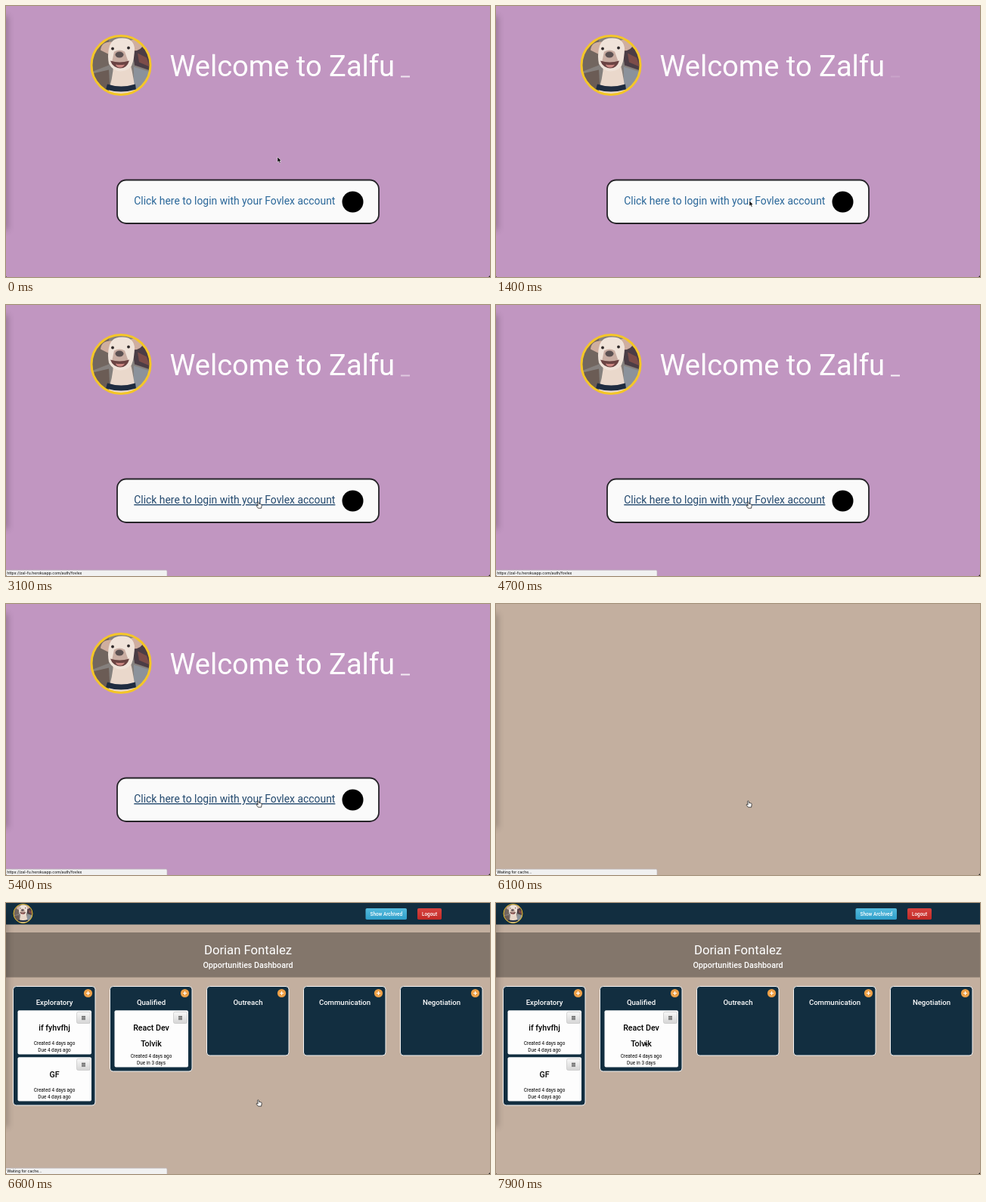
Recreate the animation shown at these times as an HTML page. Size 640 by 359 pixels, loop 8 s.

```html
<!DOCTYPE html>
<html lang="en">
<head>
<meta charset="utf-8">
<title>Login to dashboard</title>
<style>
  html, body { margin: 0; width: 100%; height: 100%; overflow: hidden; background: #c3af9f; }
  svg { display: block; width: 640px; height: 359px; font-family: Roboto, sans-serif; }
  text { white-space: pre; }
  .mid { text-anchor: middle; }
  .bold { font-weight: 500; }
  .white { fill: #fff; }
  .status text { font: 500 5px Inter, sans-serif; fill: #222; }

  /* Scene changes are hard cuts on one shared 8 s clock. */
  .cut { animation: 8s step-end infinite; }
  #welcome { animation-name: welcome; }
  #link { animation-name: link; }
  #board { animation-name: board; }
  #url { animation-name: url; }
  #cache { animation-name: cache; }
  #arrow { animation-name: arrow; }
  #hand { animation-name: hand; }
  #pointer { animation: move 8s linear infinite; }

  @keyframes welcome { 0%, 77.5% { opacity: 1 } 68.75%, 81.25%, 100% { opacity: 0 } }
  @keyframes link {
    0%, 68.75%, 100% { fill: #2a6799; text-decoration: none }
    35% { fill: #23496e; text-decoration: underline }
  }
  @keyframes board { 0% { opacity: 0 } 81.25%, 100% { opacity: 1 } }
  @keyframes url { 0%, 75%, 100% { opacity: 0 } 36.25% { opacity: 1 } }
  @keyframes cache { 0%, 86.25%, 100% { opacity: 0 } 75% { opacity: 1 } }
  @keyframes arrow { 0%, 86.25%, 100% { opacity: 1 } 35% { opacity: 0 } }
  @keyframes hand { 0%, 86.25%, 100% { opacity: 0 } 35% { opacity: 1 } }
  @keyframes move {
    0%, 3% { transform: translate(359px, 200px); animation-timing-function: ease-in-out }
    17%, 34% { transform: translate(335px, 258px) }
    36%, 87% { transform: translate(334px, 261px); animation-timing-function: ease-in-out }
    98.5%, 100% { transform: translate(196.5px, 183px) }
  }
</style>
</head>
<body>
<svg viewBox="0 0 640 359">
  <defs>
    <clipPath id="disc"><circle r="39"/></clipPath>
    <filter id="soft" x="-200%" y="-10%" width="500%" height="120%"><feGaussianBlur stdDeviation="4"/></filter>
    <filter id="photo"><feGaussianBlur stdDeviation=".7"/></filter>
    <linearGradient id="blue" x2="0" y2="1"><stop stop-color="#55bbdd"/><stop offset="1" stop-color="#2f9fca"/></linearGradient>
    <linearGradient id="red" x2="0" y2="1"><stop stop-color="#d8433f"/><stop offset="1" stop-color="#c12a26"/></linearGradient>
    <linearGradient id="grey" x2="0" y2="1"><stop stop-color="#f8f8f8"/><stop offset="1" stop-color="#d5d5d5"/></linearGradient>
    <g id="dog">
      <g clip-path="url(#disc)"><g filter="url(#photo)">
        <path fill="#85807d" d="M-42-42H42V42H-42z"/>
        <path fill="#72665f" d="M-42-42H-16V0L-42 10z"/>
        <path fill="#6b5c55" d="M-42 12-16 6-14 42H-42z"/>
        <path fill="#4b3d45" d="M14-30 42-22V8L18 0z"/>
        <path fill="#7c4d4a" d="M22-16 34-10 38 2 24-4z"/>
        <path fill="#8b929b" d="M17 2 42 10V42H17z"/>
        <path fill="#ead8cb" d="M-10-2Q-10 16-19 42H20Q17 16 12-4z"/>
        <path fill="#cfae9f" d="M-11-31Q-26-32-27-20L-17-15zM13-33Q24-38 30-28 27-19 16-19z"/>
        <path fill="#f0e3d9" d="M-16-22Q-13-37 2-36 16-36 18-23 18-9 14 1 8 8-1 8-11 7-16-2-18-12-16-22z"/>
        <path fill="#c9ada2" d="M-9-18Q-2-22 5-18L10-4Q0 3-12-4z"/>
        <ellipse cx="-2" cy="-14" rx="5.5" ry="4" fill="#5c5152"/>
        <circle cx="-11" cy="-22" r="1.9" fill="#302a2a"/>
        <circle cx="10" cy="-23" r="1.9" fill="#302a2a"/>
        <path fill="#6a4342" d="M-14-6Q-2-2 11-6 8 4-1 4-11 3-14-6z"/>
        <path fill="#c98580" d="M-7-1Q-1 0 5-1 3 3-1 3-6 3-7-1z"/>
        <path fill="#1f2c40" d="M-18 25Q0 31 19 25L20 32Q0 38-20 32z"/>
      </g></g>
      <circle r="39" fill="none" stroke="#f4c629" stroke-width="3"/>
    </g>
  </defs>

  <rect width="640" height="359" fill="#c3af9f"/>

  <g id="welcome" class="cut">
    <rect width="640" height="359" fill="#c196c1"/>
    <use href="#dog" x="152" y="78.5"/>
    <text x="216.5" y="93" font-size="38.1" class="white">Welcome to Zalfu</text>
    <rect id="caret" x="522" y="92.5" width="12" height="2" class="white"/>
    <rect x="147" y="230.5" width="346" height="57.5" rx="12" fill="#fafafa" stroke="#252328" stroke-width="1.8"/>
    <text id="link" class="cut" x="169.3" y="263" font-size="13.9">Click here to login with your Fovlex account</text>
    <circle cx="458.5" cy="259.5" r="14"/>
  </g>

  <g id="board" class="cut">
    <rect width="640" height="28.5" fill="#122e40"/>
    <use href="#dog" transform="translate(22.5 14) scale(.32)"/>
    <rect x="475.5" y="7" width="54.5" height="15" rx="1.8" fill="url(#blue)"/>
    <text x="502.8" y="16.8" font-size="6.4" class="mid bold white">Show Archived</text>
    <rect x="544" y="7" width="32" height="15" rx="1.8" fill="url(#red)"/>
    <text x="560" y="16.8" font-size="6.4" class="mid bold white">Logout</text>
    <rect y="39" width="640" height="59.5" fill="#83766b"/>
    <text x="320" y="68" font-size="16.7" class="mid white">Dorian Fontalez</text>
    <text x="320" y="86" font-size="10.65" class="mid bold white">Opportunities Dashboard</text>
    <g id="columns"></g>
  </g>

  <rect x="-12" y="13" width="15" height="284" fill="#000" opacity=".2" filter="url(#soft)"/>

  <g id="url" class="cut status">
    <path fill="#f1f1f1" stroke="#b5b0b5" stroke-width=".6" d="M-1 351.2H211.5Q213 351.2 213 353V360H-1z"/>
    <text x="1.2" y="356.8">https://zal-fu.herokuapp.com/auth/fovlex</text>
  </g>
  <g id="cache" class="cut status">
    <path fill="#f1f1f1" stroke="#b5b0b5" stroke-width=".6" d="M-1 351.2H211.5Q213 351.2 213 353V360H-1z"/>
    <text x="1.2" y="356.8">Waiting for cache...</text>
  </g>
  <path fill="#222" d="M640 357V359H638zM0 358V359H1z"/>

  <g id="pointer">
    <path id="arrow" class="cut" stroke="#fff" stroke-width=".5" d="M0 0V7L1.6 5.6 2.8 8.2 4 7.6 2.9 5.1H5z"/>
    <path id="hand" class="cut" fill="#fff" stroke="#222" stroke-width=".8" d="M-1.4.3Q-.6-.6.2.3L.7 2.6 2.8 2.8Q4.2 3 4.2 4.4L3.6 8.2H-.6L-2.9 5.2Q-2.8 4-1.6 4.6L-.8 5z"/>
  </g>
</svg>
<script>
  const $ = id => document.getElementById(id);

  const label = (x, y, size, str, cls = 'bold') =>
    `<text x="${x}" y="${y}" font-size="${size}" class="mid ${cls}">${str}</text>`;
  const box = (x, y, w, h, r, attrs) =>
    `<rect x="${x}" y="${y}" width="${w}" height="${h}" rx="${r}" ${attrs}/>`;

  function card(x, y, { lines, due }) {
    const h = lines.length > 1 ? 75.3 : 58.3;
    const end = y + h;
    const mid = x + 54.5;
    return box(x + 6, y, 97.5, h, 2, 'fill="#fdfdfd"') +
      box(x + 84, y + 2, 18, 15.2, 2, 'fill="url(#grey)" stroke="#c4c4c4" stroke-width=".7"') +
      `<path stroke="#222" stroke-width=".9" d="M${x + 90.5} ${y + 8}h5m-5 1.9h5m-5 1.9h5"/>` +
      lines.map((s, i) => label(mid, y + 27 + i * 21, 10.65, s)).join('') +
      label(mid, end - 13, 6.4, 'Created 4 days ago', '') +
      label(mid, end - 3.7, 6.4, due, '');
  }

  function column({ title, cards = [], bottom = 202 }, i) {
    const x = 9.5 + i * 128;
    return box(x, 110.5, 108.5, bottom - 110.5, 4, 'fill="#122e40" stroke="#f4f4f4"') +
      `<circle cx="${x + 99}" cy="119.5" r="5.6" fill="#eda047"/>` +
      `<path stroke="#fff" stroke-width="1.2" d="M${x + 96.5} 119.5h5m-2.5-2.5v5"/>` +
      label(x + 54.5, 135, 9.6, title, 'bold white') +
      cards.map((c, n) => card(x, 142.3 + n * 62, c)).join('');
  }

  const ago = 'Due 4 days ago';
  $('columns').innerHTML = [
    { title: 'Exploratory', bottom: 268, cards: [{ lines: ['if fyhvfhj'], due: ago }, { lines: ['GF'], due: ago }] },
    { title: 'Qualified', bottom: 223, cards: [{ lines: ['React Dev', 'Tolvik'], due: 'Due in 3 days' }] },
    { title: 'Outreach' },
    { title: 'Communication' },
    { title: 'Negotiation' }
  ].map(column).join('');

  // The caret's blink does not divide the loop, so it reads the CSS clock.
  const clock = $('pointer').getAnimations()[0];
  const BLINK = 600;

  function tick() {
    const t = (clock.currentTime || 0) % 8000;
    const peak = t < 6000 ? 525 : 6300;
    const phase = ((t - peak) % BLINK + BLINK) % BLINK / BLINK;
    $('caret').style.opacity = Math.abs(1 - 2 * phase);
    requestAnimationFrame(tick);
  }
  tick();
</script>
</body>
</html>
```
